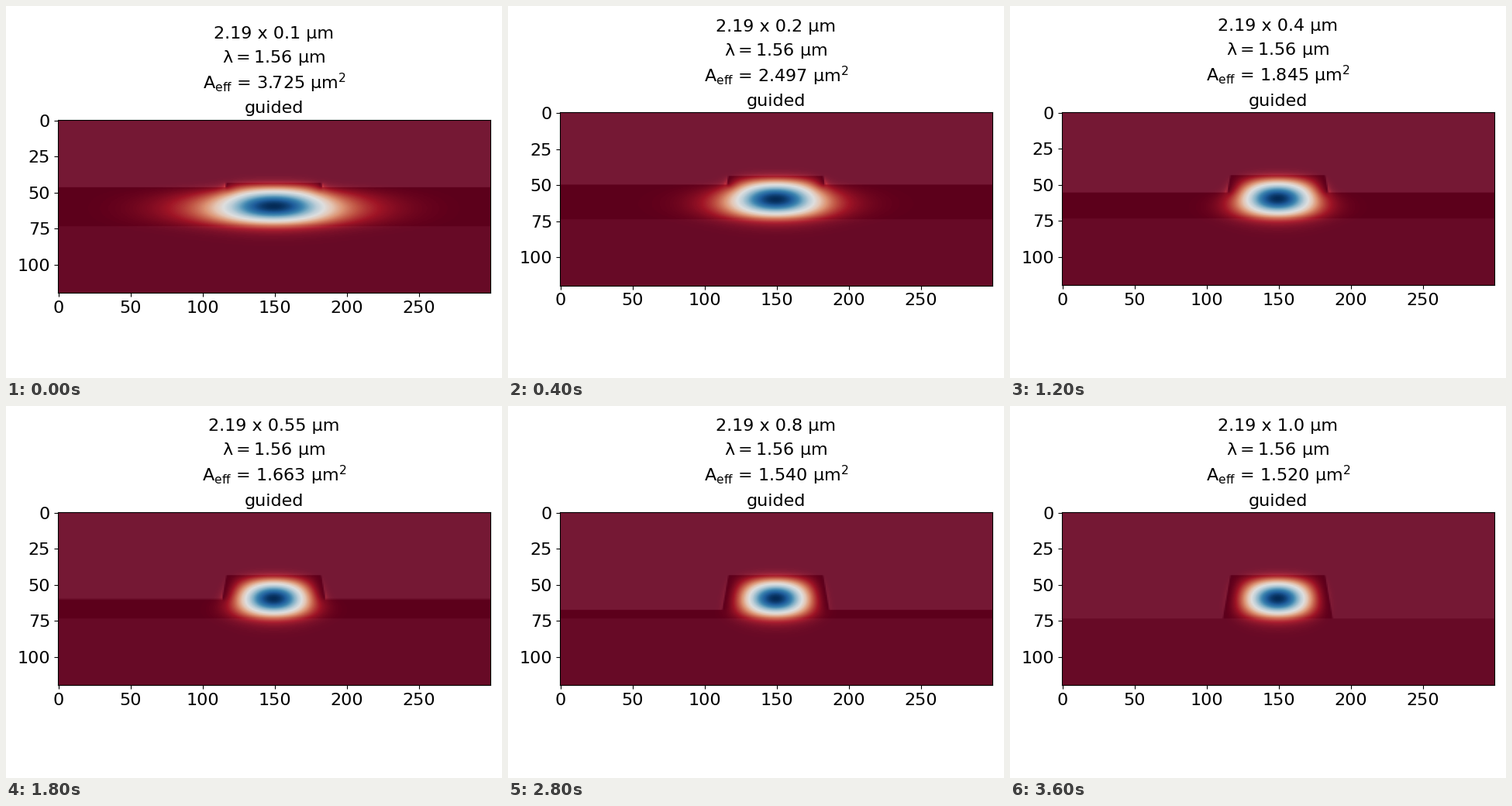
These frames come from a looping animation (640 by 480 pixels, 3.8 s). A matplotlib script:

```python
import numpy as np
import matplotlib.pyplot as plt
from matplotlib.animation import FuncAnimation

plt.rcParams["font.family"] = "DejaVu Sans"
plt.rcParams["mathtext.default"] = "regular"

W, H = 640, 480
STEPS = 19
ROWS, COLS = 120, 300
PER_UM = 30                      # grid cells per micrometre
WIDTH, WAVELENGTH = 2.19, 1.56
TOP, BASE, MID = 44, 74, 149     # ridge top row, film bottom row, centre column
N_AIR, N_FILM, N_BASE = 1.0, 2.138, 1.746
AREAS = [3.725, 2.895, 2.497, 2.253, 2.081, 1.950, 1.845, 1.771, 1.712, 1.663,
         1.626, 1.596, 1.572, 1.554, 1.540, 1.531, 1.525, 1.521, 1.520]
LINE_RISE = [75.5, 53.2, 28.4, 6]  # title baselines above the axes, in points


def etch_depth(i):
    return round(0.1 + 0.05 * i, 2)


def mirror(half):
    """Unfold the left half around the centre column."""
    return np.pad(half, ((0, 0), (0, COLS - MID - 1)), mode="reflect")


def index_map(etch):
    """Left half of a ridge with 80 degree walls on a thin film."""
    y = np.arange(ROWS)[:, None]
    x = np.arange(MID + 1)[None, :]
    half = WIDTH * PER_UM / 2 + (y + 0.5 - TOP) * np.tan(np.radians(10))
    ridge = np.clip(half - (MID - x) + 0.5, 0, 1) * (y >= TOP)
    slab = np.clip(y + 1 - (TOP + PER_UM * etch), 0, 1)
    n = N_AIR + (N_FILM - N_AIR) * np.maximum(ridge, slab)
    return np.where(y >= BASE, N_BASE, n)


def solve_mode(n, rounds=20):
    """Fundamental quasi-TE field: inverse iteration, one block per column."""
    eps = n ** 2
    c = PER_UM ** 2
    k0 = 2 * np.pi / WAVELENGTH
    last = MID
    bend = c * (np.eye(ROWS, k=1) + np.eye(ROWS, k=-1) - 2 * np.eye(ROWS))

    # the centre column alone gives an upper bound for the eigenvalue
    shift = np.linalg.eigvalsh(bend + np.diag(k0 ** 2 * eps[:, -1]))[-1]

    face = 2 * c / (eps[:, 1:] + eps[:, :-1])
    left = np.hstack([c / eps[:, :1], face])
    right = np.hstack([face, face[:, -1:]])
    diag = k0 ** 2 * eps - eps * (left + right) - shift
    down = (face * eps[:, :-1]).T.copy()    # column j + 1 from column j
    up = (face * eps[:, 1:]).T.copy()       # column j from column j + 1
    down[-1] *= 2                           # even symmetry at the centre

    inv = [np.linalg.inv(bend + np.diag(diag[:, 0]))]
    for j in range(last):
        block = bend + np.diag(diag[:, j + 1])
        inv.append(np.linalg.inv(block - down[j][:, None] * inv[j] * up[j]))

    y, x = np.mgrid[:ROWS, :MID + 1]
    v = np.exp(-((x - MID) / 27) ** 2 - ((y - 60) / 13) ** 2).T
    for _ in range(rounds):
        v[0] = inv[0] @ v[0]
        for j in range(last):
            v[j + 1] = inv[j + 1] @ (v[j + 1] - down[j] * v[j])
        for j in reversed(range(last)):
            v[j] -= inv[j] @ (up[j] * v[j + 1])
        v /= abs(v).max()
    return v.T


def make_step(i):
    n = index_map(etch_depth(i))
    power = solve_mode(n) ** 2
    return mirror(n), mirror(power / power.max())


steps = [make_step(i) for i in range(STEPS)]

fig = plt.figure(figsize=(W / 100, H / 100), dpi=100, facecolor="white")
ax = fig.add_axes([0.1, 0.1, 0.8, 0.8])
field = ax.imshow(steps[0][1], cmap="RdBu", vmin=0, vmax=1, aspect="auto")
layers = ax.imshow(steps[0][0], cmap="Greys", vmin=N_AIR, vmax=N_FILM,
                   alpha=0.1, aspect="auto")
ax.set_xticks(range(0, 251, 50))
ax.set_yticks(range(0, 101, 25))
ax.tick_params(labelsize=16)
lines = [ax.annotate("", (0.5, 1), xycoords="axes fraction", xytext=(0, rise),
                     textcoords="offset points", ha="center", va="baseline",
                     fontsize=16) for rise in LINE_RISE]


def update(i):
    # the layout settles over the first few steps
    top = 343.15 - 9.8 * 0.25 ** i
    height = 223.24
    ax.set_position([66.95 / W, (top - height) / H, 558.05 / W, height / H])
    n, power = steps[i]
    field.set_data(power)
    layers.set_data(n)
    words = [f"{WIDTH} x {etch_depth(i)} µm",
             rf"$\lambda = {WAVELENGTH}$ µm",
             r"$A_{eff}$" f" = {AREAS[i]:.3f} µm$^2$",
             "guided"]
    for line, text in zip(lines, words):
        line.set_text(text)
    return [field, layers, *lines]


anim = FuncAnimation(fig, update, frames=STEPS, interval=200, repeat=True)
plt.show()
```
